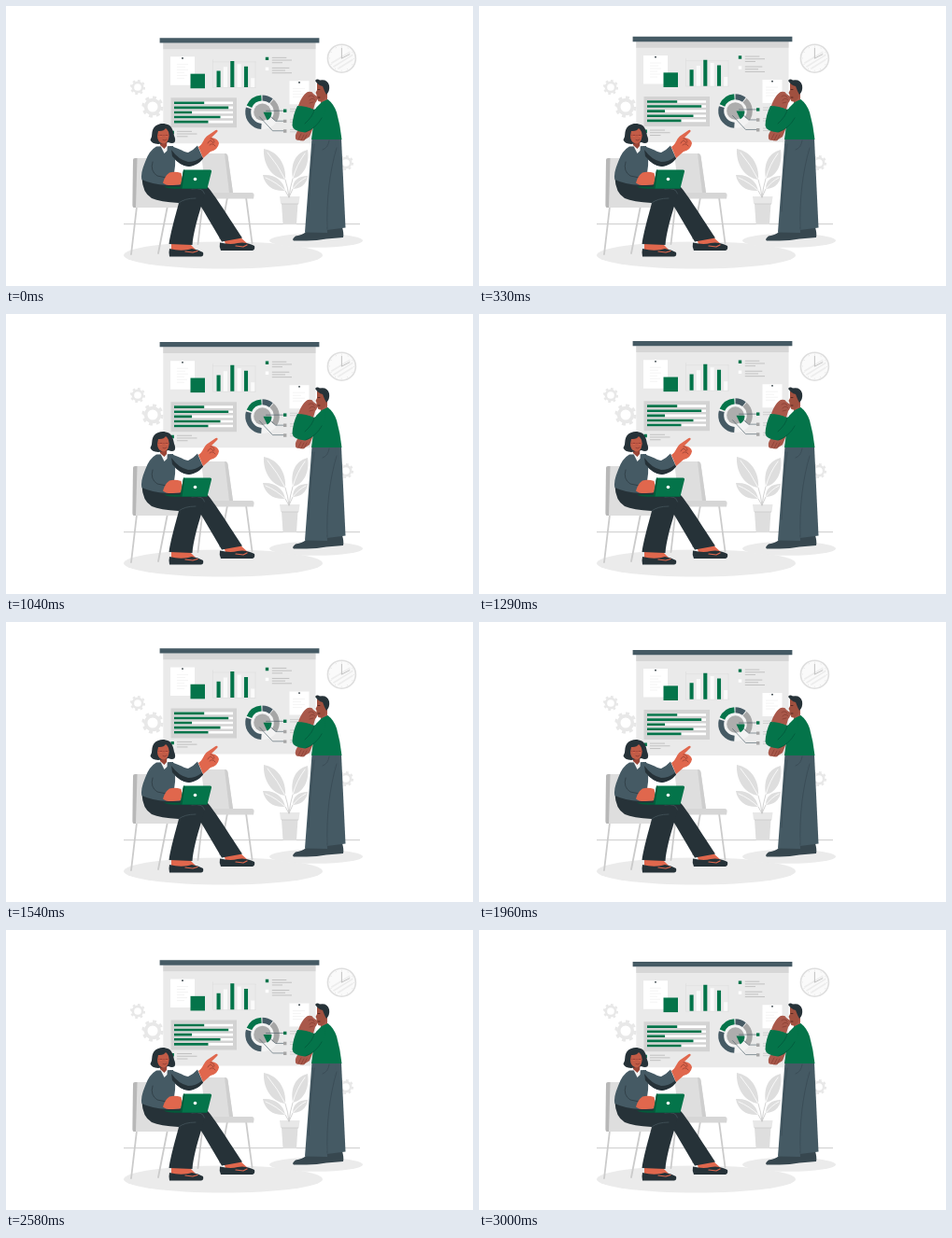
Write an HTML page that moves like this. It is 500 px wide and 300 px high and loops after 3.04 s.

```html
<!DOCTYPE html>
<html lang="en">
<head>
<meta charset="utf-8">
<title>Presentation</title>
<style>
  html, body { margin: 0; width: 100%; height: 100%; overflow: hidden; background: #fff; }
  svg { display: block; width: 500px; height: 300px; }
  .line { fill: none; stroke-linecap: round; stroke-linejoin: round; }
  .green { fill: #04744a; } .slate { fill: #455a64; } .ink { fill: #263238; }
  .coral { fill: #e0674d; } .brown { fill: #a9584a; }
</style>
</head>
<body>
<svg viewBox="0 0 500 300">
  <defs>
    <g id="gear" fill="none" stroke="#e8e8e8">
      <circle r="6.4" stroke-width="3.2"/>
      <circle r="8.8" stroke-width="2.6" pathLength="16" stroke-dasharray="1 1"/>
    </g>
  </defs>

  <!-- room -->
  <path d="M126 233.6H379" stroke="#aaa" stroke-width=".6"/>
  <ellipse cx="232.5" cy="267" rx="106.5" ry="14.5" fill="#ebebeb"/>
  <ellipse cx="332" cy="251.3" rx="50" ry="7.5" fill="#ebebeb"/>
  <use href="#gear" transform="translate(141 87) scale(.8)"/>
  <use href="#gear" transform="translate(157 108) scale(1.15)"/>
  <use href="#gear" transform="translate(364 168) scale(.8)"/>
  <g transform="translate(359.4 56.2)">
    <circle r="15" fill="#fafafa" stroke="#dedede" stroke-width="1.6"/>
    <path d="M-11 5L9-7M-9 9L12-4M-4 11L12 1" stroke="#ededed" stroke-width="1.6"/>
    <path class="line" d="M0-11V0L8.5-4.5" stroke="#bbb" stroke-width=".9"/>
    <circle r="13" fill="none" stroke="#ccc" stroke-width="1" pathLength="120" stroke-dasharray=".7 9.3"/>
  </g>

  <!-- floating board -->
  <g id="board">
    <path d="M168.3 39H331.5V147H168.3z" fill="#eaeaea"/>
    <path d="M168.3 39H331.5V45.8H168.3z" fill="#d6d6d6"/>
    <path class="slate" d="M164.6 33.8H335.4V39.1H164.6z"/>

    <path d="M176 54H202V84.5H176zM303.5 80H324.5V105H303.5z" fill="#fff"/>
    <path d="M183 62h12m-12 3h9m-9 3h12m-12 3h8m-8 3h11m-11 3h8M307 88h13m-13 3h9m-9 3h13m-13 3h10" stroke="#ededed" stroke-width=".6"/>
    <circle cx="189" cy="55.600" r=".9" class="ink"/><circle cx="314" cy="81.600" r=".9" class="ink"/>
    <path class="green" d="M197.5 72.300h15.500V87.900h-15.500z"/>

    <path d="M221.5 57V87H267.5M221.5 59.5h46M267 59.5V87" fill="none" stroke="#d6d6d6" stroke-width=".4"/>
    <g fill="none" stroke-width="4.1">
      <path d="M234.9 86.6V65M249.6 86.6V62M264.2 86.6V77" stroke="#fafafa"/>
      <path d="M227.6 86.6V69.2M242.3 86.6V58.6M257 86.6V64.5" stroke="#04744a"/>
    </g>

    <path class="green" d="M277.8 54.3h3.4v3.4h-3.4zM176.5 133.5h3.4v3.4h-3.4z"/>
    <path d="M277.8 65.3h3.4v3.4h-3.4z" fill="#fff"/>
    <path d="M284.8 55h15.5m-15.5 2.7H306m-21.2 2.7H296m-11.2 5.6h18.5m-18.5 2.7H299m-14.2 2.7H306M183 134h16m-16 2.7h21.5m-21.5 2.8h11.5" stroke="#bdbdbd" stroke-width=".9"/>

    <path d="M176.5 98H247V130H176.5z" fill="#d3d3d3"/>
    <g fill="none" stroke-width="2.6">
      <path d="M180 103.4h63m-63 5.1h63m-63 5.1h63m-63 5.1h63m-63 5.1h63" stroke="#fff"/>
      <path d="M180 103.4h32.2M180 108.5h58.2M180 113.6h19M180 118.7h49.5M180 123.800h36.5" stroke="#04744a"/>
    </g>

    <g transform="translate(274.5 113.4)">
      <circle r="18.4" fill="#f3f3f3"/>
      <g fill="none" stroke-width="6">
        <circle r="15.3" stroke="#04744a" pathLength="360" stroke-dasharray="63 360" transform="rotate(-157)"/>
        <circle r="15.3" stroke="#455a64" pathLength="360" stroke-dasharray="38 360" transform="rotate(-90)"/>
        <circle r="15.3" stroke="#a6a6a6" pathLength="360" stroke-dasharray="82 360" transform="rotate(-49)"/>
        <circle r="15.3" stroke="#455a64" pathLength="360" stroke-dasharray="103 360" transform="rotate(94)"/>
      </g>
      <circle r="9.3" fill="#adadad"/>
      <path class="green" d="M1 0H10A10 10 0 0 1 5.2 8.8z"/>
      <path class="line" d="M4-1.500H23M8 4L14 9.500H23M-3 5L11 20H23" stroke="#455a64" stroke-width=".6"/>
    </g>
    <path class="green" d="M297 110.2h3.4v3.4H297z"/>
    <path d="M297 121.3h3.4v3.4H297zM297 132h3.4v3.4H297z" fill="#a6a6a6"/>
    <path d="M304 110h20m-20 2.5h16m-16 9h18m-18 2.5h12m-12 8h18m-18 2.5h14" stroke="#c8c8c8" stroke-width=".8"/>
  </g>

  <!-- plant -->
  <g fill="#dedede">
    <path d="M299 186C284 184 275 169 276 153C291 156 300 169 299 186z"/>
    <path d="M307 185C304 168 311 157 323 154C325 170 319 182 307 185z"/>
    <path d="M299 198C287 199 277 193 275 181C288 180 297 187 299 198z"/>
    <path d="M307 196C307 187 313 182 323 182C322 191 315 196 307 196z"/>
    <path d="M295 211H312.5L311 234H296.5z"/>
    <path d="M293 204H314.5L313.5 212H294z" fill="#e8e8e8"/>
  </g>
  <path d="M295 212H313" stroke="#cfcfcf" stroke-width="1"/>
  <path class="line" d="M280 157Q291 170 299 186M320 158Q311 170 307 185M278 184Q290 189 299 198M321 184Q313 188 307 196" stroke="#fff" stroke-width=".8"/>
  <path class="line" d="M299 186Q302 195 303 205M307 185Q304 195 303 205M299 198L303 205L307 196" stroke="#c8c8c8" stroke-width=".8"/>

  <!-- chairs -->
  <path class="line" d="M211 207L205.5 255M237 205L229 249M257 205L263.5 254" stroke="#cbcbcb" stroke-width="1.8"/>
  <path d="M209 158H234.5Q237 158 237.5 161L243 200H214z" fill="#dedede"/>
  <path d="M234 158Q237 158 237.5 161L243 200H239z" fill="#cecece"/>
  <path d="M214 200H263Q266 200 265.5 203.5L265 206.5H212z" fill="#d6d6d6"/>
  <path class="line" d="M140 215L134 266M173 214L163 265" stroke="#cbcbcb" stroke-width="1.8"/>
  <path d="M136 165Q136 163 138.5 163H160L172 205L196 207V216H137Q135.5 216 135.5 213z" fill="#dedede"/>
  <path d="M136 165Q136 163 138.5 163H140.5L139 216H137Q135.5 216 135.5 213z" fill="#b8b8b8"/>

  <!-- seated presenter -->
  <path class="coral" d="M233 249L250 247L260 256L236 258zM177 254H196L206 264H177z"/>
  <path class="ink" d="M181 191L215 193C222 200 240 229 253 248.500L231 252.500L206 210L190 200z"/>
  <path class="ink" d="M145.5 184Q156 191 172 191Q203 188 213 197C213 207 202 231 199.500 256L174.500 255C177 239 183 219 185 211Q165 210 156 206Q146 200 145.500 184z"/>
  <path class="line" d="M185 211Q191 206 203 206M199 196Q211 194 212.500 201" stroke="#54666f" stroke-width=".5"/>
  <path class="ink" d="M229 253.500Q240 256 248 254L253 253.500Q261 254 266 257Q267 261 264 262H230Q228 258 229 253.500z"/>
  <path class="ink" d="M175 260Q186 263 195 261L199 260Q206 261 211 264Q212 268 209 268.500H175Q174 264 175 260z"/>
  <path class="line" d="M246 257L254 258L258 256M192 263L200 264L205 262.500" stroke="#e0674d" stroke-width="1.2"/>

  <path class="slate" d="M161 150.500L179 150Q183 162 180 179L186 192H172Q156 191 145.500 186Q143.500 180 149 167Q153 155 161 150.500z"/>
  <path d="M165 149L173 148L172.500 155L169.500 158z" fill="#f4f4f4"/>
  <path d="M165 144H172.500L172 150L169.500 153L165 149z" fill="#9b4638"/>
  <path class="slate" d="M175 150C183 151 189 156 195 157Q200 155 205 149.500L211 163.500Q205 171 196 172Q187 172 178 161z"/>
  <path class="ink" d="M177 154Q185 165 195 167Q203 167 210 161.500L211 163.500Q205 171 196 172Q187 172 178 161z"/>
  <path class="line" d="M157 167Q154 177 162 182L172 184" stroke="#263238" stroke-width=".6"/>
  <path class="coral" d="M206 151C211 148 211 143 215 139.500L224.500 133Q227 132 226.500 134.500L220 141Q227 142 228 147Q227 154 219 156L211 163z"/>
  <path class="line" d="M219 142Q223 142 223 146M216 147Q219 141 222 147M218 149Q221 146 224 150" stroke="#8c3b30" stroke-width=".7"/>

  <path class="ink" d="M156.500 135C158 127 166 125 171 126.500C177 127 179 133 180 139Q182 143 180.500 146Q178 148 174 146L163 148Q156 147.500 154.500 143.500Q156.500 140 156.500 135z"/>
  <path d="M163 134Q169 134.500 171 131Q175 134 174.500 140Q173.500 147.500 168 147.500Q162 146 162 139z" fill="#c25c47"/>
  <path class="line" d="M163 138.500H174.500M168 143.500Q170 145 172 143" stroke="#7e2f2a" stroke-width=".6"/>
  <path class="line" d="M164 138.500q2 3 4 0m2 0q2 3 4 0" stroke="#e0674d" stroke-width=".8"/>

  <path class="coral" d="M168 189.500Q170 182 175 178.500Q181 177 187.500 179L190 191L179 192Q171 192.500 168 189.500z"/>
  <path d="M169 193.500H216L215 195.800H190Q172 196 169 193.500z" fill="#035a3a"/>
  <path class="green" d="M190 175.500H218.500Q220.500 175.500 220 177.500L215.500 195.500H188.500L187 193z"/>
  <path d="M190 175.500L187 193L188.500 195.500L191.500 176z" fill="#035a3a"/>
  <circle cx="202.500" cy="185.500" r="1.800" fill="#fff"/>

  <!-- standing listener -->
  <path d="M343 237H360Q362 244 361 248L343 249.500zM321 242H343V249.500Q333 251.500 322 251.500H308Q305.500 250 310 246.500Q318 245 321 242z" fill="#37474f"/>
  <path class="slate" d="M340 142H359L363.500 237.500L343.500 240z"/>
  <path class="slate" d="M327.500 142H353C349 176 343 212 344 243L320 242.500z"/>
  <path class="line" d="M354 152C346 179 343 209 344 239M330 148Q326 174 324 220M346 144q-1 8-7 10" stroke="#34464f" stroke-width=".6"/>

  <path class="brown" d="M336 93H344V102L337 104z"/>
  <path class="green" d="M338 103L344.500 100Q351 105 354 114Q358 128 359.500 143H327L329 128L332 109z"/>
  <path class="brown" d="M312 134L319 127L329 130L325 140L318 144.500L311 143.500Q308 140 312 134z"/>
  <path class="line" d="M313 143l3-6m0 7l3-6m0 6l3-6" stroke="#7d372d" stroke-width=".6"/>
  <path d="M333 83Q338 81 343 87V97Q338 104 334.500 102Q332 99 332.500 95L331.500 93L333 90z" fill="#a0503f"/>
  <path class="ink" d="M331 80Q333 77.500 336 79.500Q344 78 346 85Q347 91 343 95L341 91L339 86Q334 85 331 80z"/>
  <path class="line" d="M334 89.500h2m-2 8.500h2" stroke="#4a211c" stroke-width=".8"/>
  <path class="brown" d="M313 107C315 101 318 95 323 92Q328 91 329 94L333 97Q334 101 331 104L329 111L318 109z"/>
  <path class="line" d="M324 97Q328 94 330 98M325 101Q328 97 331 101M325 104l4-1" stroke="#7d372d" stroke-width=".6"/>
  <path class="green" d="M312 107Q321 107 330 111L341 104Q344 112 338 120Q331 132 320 135.500Q307 134 306.500 128Q307 117 312 107z"/>
  <path class="line" d="M330 111Q329 118 320 126M338 120Q332 131 321 135" stroke="#03553a" stroke-width=".7"/>
</svg>
<script>
  const board = document.getElementById('board');
  const period = 3040, lift = 6, rest = .35;

  function draw(now) {
    const phase = now % period / period;
    const y = rest - lift * (1 - Math.abs(1 - 2 * phase));
    board.setAttribute('transform', `translate(0 ${y})`);
    requestAnimationFrame(draw);
  }
  draw(0);
</script>
</body>
</html>
```
